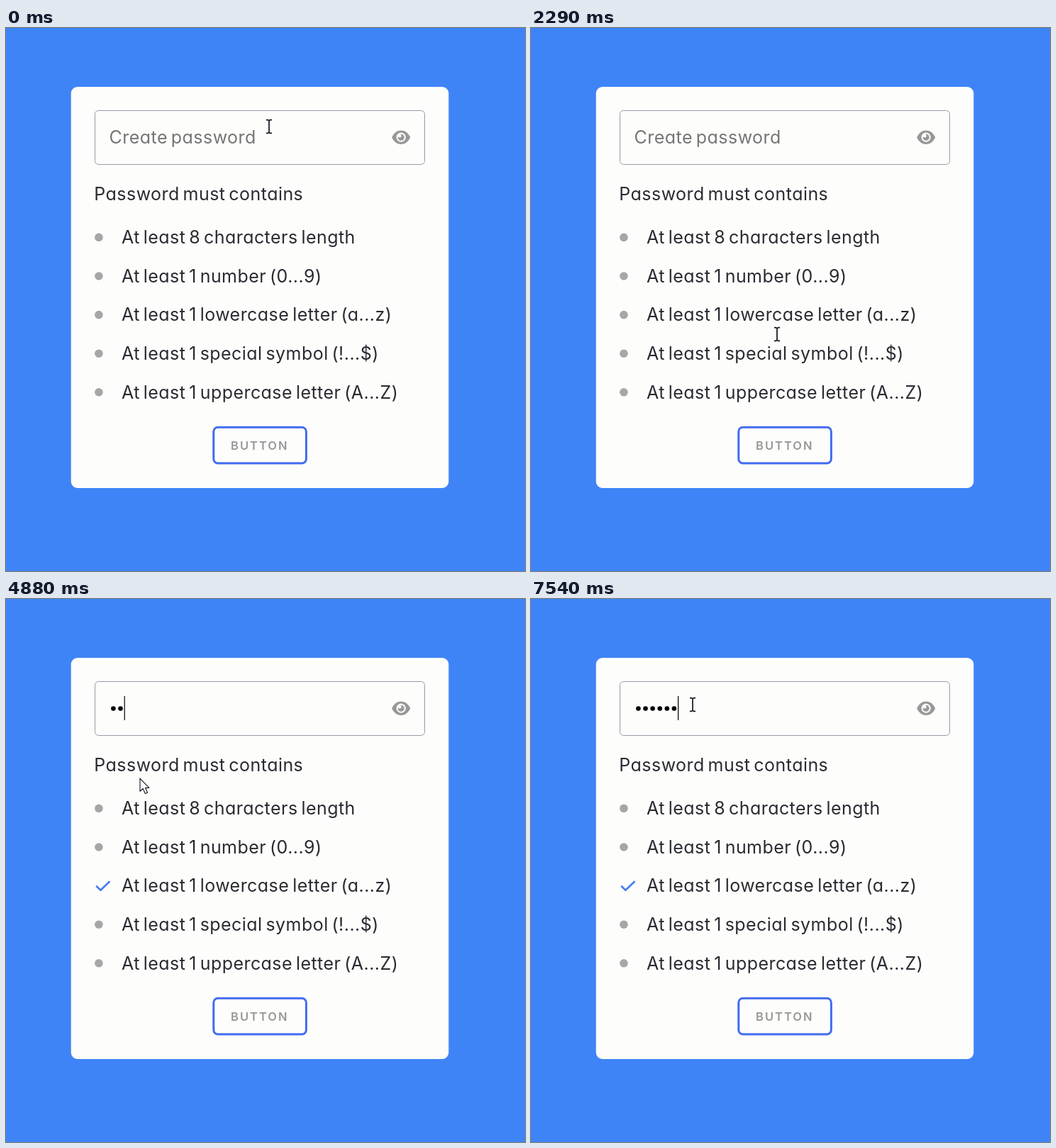
An HTML page for the animation above (8000 ms loop, 732 by 766 pixels).

```html
<!DOCTYPE html>
<html lang="en">
<head>
<meta charset="utf-8">
<title>Password checklist</title>
<style>
  html, body { margin: 0; width: 100%; height: 100%; overflow: hidden; background: #3f84f6; }
  svg { display: block; width: 732px; height: 766px; }
  text {
    font: 400 25px Inter, "Open Sans", sans-serif;
    font-feature-settings: "cv11";
    font-optical-sizing: none;
    letter-spacing: .45px;
    word-spacing: -2.6px;
    fill: #2a2b32;
  }
  #hint { fill: #757575; }
  .label { font-size: 16.5px; font-weight: 600; letter-spacing: 2px; fill: #989898; }
</style>
</head>
<body>
<svg viewBox="0 0 732 766">
  <rect width="732" height="766" fill="#3f84f6"/>
  <rect x="91.7" y="83" width="532.6" height="566" rx="9" fill="#fdfdfb"/>
  <rect x="125.5" y="116.5" width="465" height="76" rx="5" fill="none" stroke="#9a9aa6"/>

  <g transform="translate(557.2 154.2)" fill="#989898">
    <path d="M-13 0C-10.6-5.6-6-9.8 0-9.8S10.6-5.6 13 0C10.6 5.6 6 9.8 0 9.8S-10.6 5.6-13 0Z"/>
    <circle r="6.6" fill="#fdfdfb"/>
    <circle r="4.5"/>
    <circle cx="-2" cy="-2" r="2.4" fill="#fdfdfb"/>
  </g>

  <text id="hint" x="145.6" y="163">Create password</text>
  <text x="124.3" y="243.4">Password must contains</text>
  <g id="rules"></g>
  <path id="check" d="M128 405.5L133.4 410.8L145.6 399" fill="none" stroke="#4a7df0"
        stroke-width="2.8" stroke-linecap="round" stroke-linejoin="round"/>

  <rect x="292.8" y="563.2" width="130.6" height="50.8" rx="6" fill="none" stroke="#416cf0" stroke-width="3"/>
  <text class="label" x="317" y="595">BUTTON</text>

  <g id="dots"></g>
  <rect id="caret" y="137" width="1.2" height="34"/>

  <path id="arrow" d="M.5 .5V18.6L4.7 14.8L7.8 21.8L11 20.4L8 13.6H13.4Z" fill="#fff"
        stroke="#25252d" stroke-width="1.2" stroke-linejoin="round"/>
  <g id="beam" fill="none" stroke-linejoin="round">
    <path id="halo" stroke="#fff" stroke-width="3.6"/>
    <path id="stem" stroke="#15151a" stroke-width="1.7"/>
  </g>
</svg>
<script>
const LOOP = 8000;
const NS = "http://www.w3.org/2000/svg";
const $ = id => document.getElementById(id);

function add(parent, tag, attrs, content) {
  const el = document.createElementNS(NS, tag);
  for (const k in attrs) el.setAttribute(k, attrs[k]);
  if (content) el.textContent = content;
  parent.appendChild(el);
  return el;
}

const rules = [
  "8 characters length",
  "1 number (0...9)",
  "1 lowercase letter (a...z)",
  "1 special symbol (!...$)",
  "1 uppercase letter (A...Z)"
];
const bullets = rules.map((rule, i) => {
  const y = 295.4 + i * 54.6;
  add($("rules"), "text", { x: 163, y: y + 8.8 }, "At least " + rule);
  return add($("rules"), "circle", { cx: 130.9, cy: y, r: 5.8, fill: "#a6a6a8" });
});

// Six characters: a quick pair, then four more at a steady pace.
const PITCH = 10.1;
const keyTime = i => i < 2 ? 3540 + 90 * i : 5920 + 200 * (i - 2);
const keys = Array.from({ length: 6 }, (_, i) => keyTime(i));
const dots = keys.map((_, i) =>
  add($("dots"), "circle", { cx: 151.4 + i * PITCH, cy: 154.5, r: 3.3 }));

const beamShape = "M-4-9.3H-1.4L0-8.2L1.4-9.3H4M0-8.2V8.2M-4 9.3H-1.4L0 8.2L1.4 9.3H4";
$("halo").setAttribute("d", beamShape);
$("stem").setAttribute("d", beamShape);

// Pointer stops: time, x, y.
const stops = [
  [0, 371, 139], [210, 371, 139], [1130, 264, 410], [1650, 350, 500], [2290, 347, 432],
  [2880, 222, 171], [4330, 222, 171], [5540, 144, 361], [5750, 228, 149], [LOOP, 228, 149]
];

function pointer(t) {
  const i = stops.findIndex(s => t < s[0]);
  const [t0, x0, y0] = stops[i - 1], [t1, x1, y1] = stops[i];
  const p = (1 - Math.cos(Math.PI * (t - t0) / (t1 - t0))) / 2;
  return { x: x0 + (x1 - x0) * p, y: y0 + (y1 - y0) * p };
}

// The caret blinks every 500 ms, restarting with each key.
function caretOn(t, count) {
  if (!count) return t >= 3000 && t < 3420;
  return Math.floor((t - keys[count - 1]) / 500) % 2 === 0;
}

const show = (el, on) => el.setAttribute("visibility", on ? "visible" : "hidden");

function draw(t) {
  const count = keys.filter(k => t >= k).length;
  show($("hint"), !count);
  show(bullets[2], !count);
  show($("check"), count);
  dots.forEach((d, i) => show(d, i < count));

  show($("caret"), caretOn(t, count));
  $("caret").setAttribute("x", 146.4 + count * PITCH);

  // Beam inside the field or over the longer words, arrow elsewhere.
  const { x, y } = pointer(t);
  const overText = y < 193 || x > 270;
  for (const id of ["beam", "arrow"]) {
    $(id).setAttribute("transform", `translate(${x.toFixed(1)} ${y.toFixed(1)})`);
    show($(id), overText === (id === "beam"));
  }
}

function tick() {
  draw(performance.now() % LOOP);
  requestAnimationFrame(tick);
}
draw(0);
requestAnimationFrame(tick);
</script>
</body>
</html>
```
